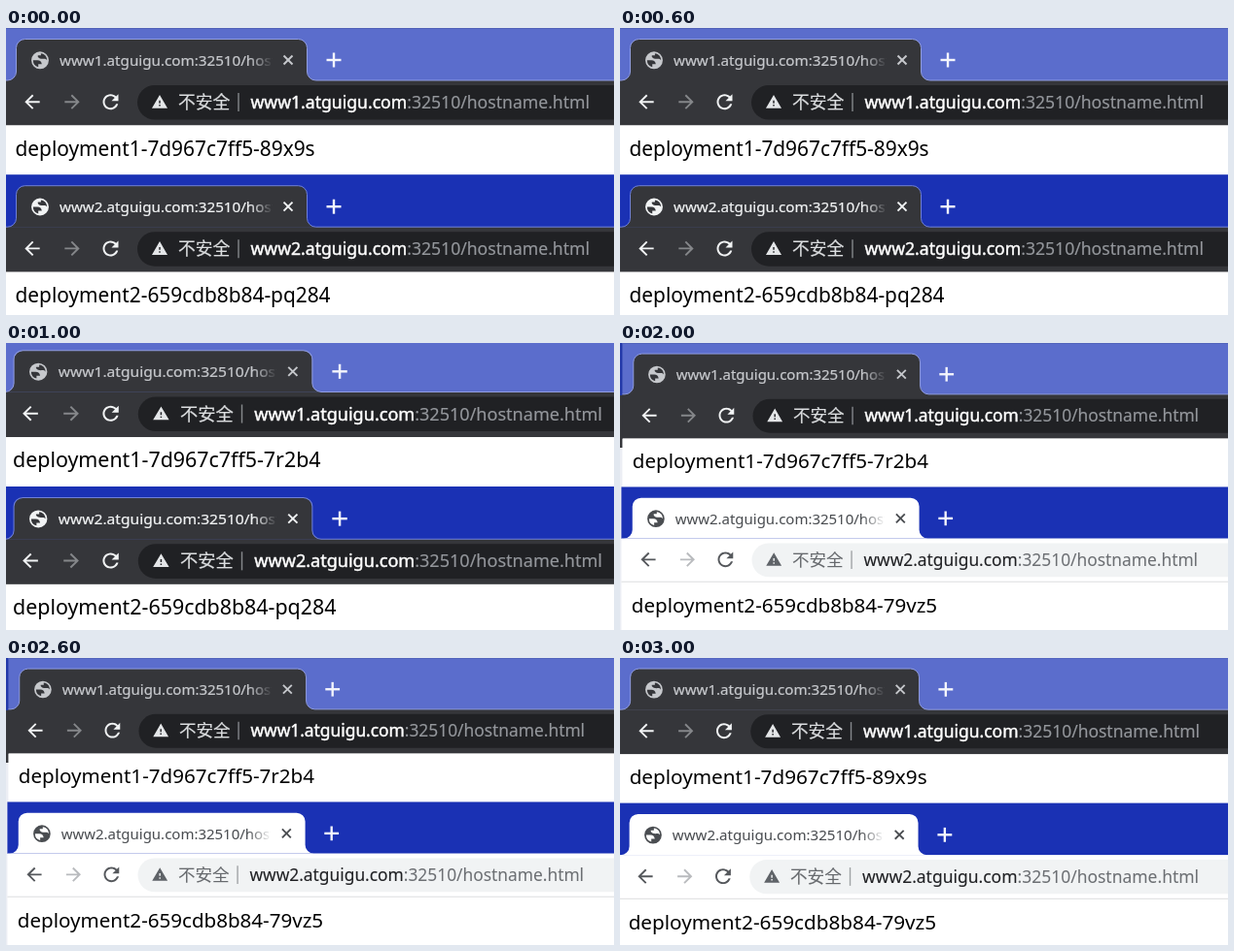
Animation, 625 px wide and 296 px high, one loop 4 s. Source, as an HTML page with a canvas:

```html
<!DOCTYPE html>
<html lang="zh">
<head>
<meta charset="utf-8">
<style>
html, body { margin: 0; width: 100%; height: 100%; overflow: hidden; background: #fff; }
canvas { display: block; }
</style>
</head>
<body>
<canvas id="stage" width="625" height="296"></canvas>
<script>
const ctx = document.getElementById('stage').getContext('2d');
const LATIN = '"Noto Sans", "Open Sans", sans-serif';
const CJK = '"Noto Sans CJK SC", "Noto Sans CJK", sans-serif';

const ICONS = {
  globe: 'M2 12a10 10 0 1 0 20 0a10 10 0 1 0 -20 0zM4 12h5c3 0 4.6 1.7 5 4.5h-4v3.2A8 8 0 0 1 4 12zM13 4.1C17.5 4.6 20 8 20 12c-.8-1.3-2-1.7-3.3-1.7C14 10.5 11 10.5 9.5 8V6.5H13z',
  arrow: 'M20 11H7.83l5.59-5.59L12 4l-8 8 8 8 1.41-1.41L7.83 13H20v-2z',
  reload: 'M17.65 6.35C16.2 4.9 14.21 4 12 4c-4.42 0-7.99 3.58-7.99 8s3.57 8 7.99 8c3.73 0 6.84-2.55 7.73-6h-2.08c-.82 2.33-3.04 4-5.65 4-3.31 0-6-2.69-6-6s2.69-6 6-6c1.66 0 3.14.69 4.22 1.78L13 11h7V4l-2.35 2.35z',
  warning: 'M1 21h22L12 2 1 21zm12-3h-2v-2h2v2zm0-4h-2v-4h2v4z'
};
for (const name in ICONS) ICONS[name] = new Path2D(ICONS[name]);

// "bold" is the extra stroke that thickens light text on dark
const DARK = {
  bar: '#35363a', pill: '#202124', icon: '#f1f3f4', off: '#85878a', warn: '#e4e6e8', bold: 0.45,
  label: '#dcdee0', host: '#ffffff', path: '#94979c', split: '#85888c', title: '#f1f3f4', edge: '#6f80d8'
};
const DIMMED = { ...DARK, title: '#c6c8cc', edge: '#919de0' };
const LIGHT = {
  bar: '#ffffff', pill: '#f1f3f4', icon: '#55585c', off: '#b9bbbe', warn: '#5f6368', bold: 0.1,
  label: '#66696d', host: '#202124', path: '#6c6f73', split: '#a0a3a6', title: '#4a4d51'
};

// Placement of the page (offset and scale) and the pod names shown
const SCENES = [
  { x: 0, y: 0, sx: 1, sy: 1, shift: 0, pods: ['89x9s', 'pq284'], theme: DARK },
  { x: -2.7, y: -3.8, sx: 1.026, sy: 1.004, shift: 0, pods: ['7r2b4', 'pq284'], theme: DARK },
  { x: 3.4, y: -0.2, sx: 0.986, sy: 0.983, shift: -1, pods: ['7r2b4', '79vz5'], theme: LIGHT, sliver: true },
  { x: 0.2, y: -0.4, sx: 0.993, sy: 0.992, shift: -1, pods: ['89x9s', '79vz5'], theme: LIGHT }
];

function rect(x, y, w, h, color) {
  ctx.fillStyle = color;
  ctx.fillRect(x, y, w, h);
}

function text(str, x, y, size, color, bold = 0, family = LATIN) {
  ctx.font = `${size}px ${family}`;
  ctx.fillStyle = ctx.strokeStyle = color;
  ctx.fillText(str, x, y);
  if (bold) {
    ctx.lineWidth = bold;
    ctx.strokeText(str, x, y);
  }
  return x + ctx.measureText(str).width;
}

function icon(name, x, y, size, color, flip = 1) {
  ctx.save();
  ctx.translate(x, y);
  ctx.scale(size / 24 * flip, size / 24);
  ctx.translate(-12, -12);
  ctx.fillStyle = color;
  ctx.fill(ICONS[name], 'evenodd');
  ctx.restore();
}

function line(x1, y1, x2, y2, color, width) {
  ctx.strokeStyle = color;
  ctx.lineWidth = width;
  ctx.beginPath();
  ctx.moveTo(x1, y1);
  ctx.lineTo(x2, y2);
  ctx.stroke();
}

function tab(theme) {
  const top = 11.5, base = 54, left = 10.5, right = 309.5, r = 9;
  ctx.beginPath();
  ctx.moveTo(-1, base);
  ctx.arcTo(left, base, left, top, r);
  ctx.arcTo(left, top, right, top, r);
  ctx.arcTo(right, top, right, base, r);
  ctx.arcTo(right, base, 700, base, r);
  ctx.lineTo(700, base);
  ctx.fillStyle = theme.bar;
  ctx.fill();
  if (theme.edge) {
    ctx.strokeStyle = theme.edge;
    ctx.lineWidth = 1;
    ctx.stroke();
  }
}

function browser(n, pod, strip, theme) {
  const host = `www${n}.atguigu.com`, path = ':32510/hostname.html';
  rect(-1, 0, 701, 54.5, strip);
  rect(-1, 54, 701, 46.5, theme.bar);
  rect(-1, 100.5, 701, 220, '#fff');
  if (theme === LIGHT) rect(-1, 99, 701, 1, '#dcdddf');
  tab(theme);

  icon('globe', 35, 33.3, 21.5, theme.title);
  const fade = ctx.createLinearGradient(250, 0, 274, 0);
  fade.addColorStop(0, theme.title);
  fade.addColorStop(1, theme.title + '00');
  text(host + path, 55, 39, 15.2, fade, theme.bold / 2);
  line(285.5, 28.5, 294.5, 37.5, theme.title, 1.9);
  line(294.5, 28.5, 285.5, 37.5, theme.title, 1.9);
  line(329.5, 33, 344.5, 33, '#f4f5fc', 2.4);
  line(337, 25.5, 337, 40.5, '#f4f5fc', 2.4);

  icon('arrow', 27, 76.2, 23, theme.icon);
  icon('arrow', 68, 76.2, 23, theme.off, -1);
  icon('reload', 107.5, 76.2, 24, theme.icon);
  ctx.fillStyle = theme.pill;
  ctx.beginPath();
  ctx.roundRect(135, 59, 600, 35.5, 17.7);
  ctx.fill();
  icon('warning', 158, 76.2, 17.5, theme.warn);
  text('不安全', 177, 83, 17.8, theme.label, theme.bold / 2, CJK);
  line(239, 67, 239, 86, theme.split, 1.4);
  const end = text(host, 251.5, 83, 17.6, theme.host, theme.bold);
  text(path, end, 83, 17.6, theme.path, theme.bold / 3);

  text(`deployment${n}-${pod}`, 9.5, 131.7, 20.85, '#000');
}

function draw() {
  const s = SCENES[Math.floor(performance.now() / 1000) % SCENES.length];
  ctx.setTransform(1, 0, 0, 1, 0, 0);
  rect(0, 0, 625, 296, '#fff');
  if (s.sliver) {
    rect(0, 0, 3, 54, '#2238a8');
    rect(0, 54, 3, 54, '#35363a');
    rect(0, 108, 3, 188, '#eceef4');
  }
  ctx.setTransform(s.sx, 0, 0, s.sy, s.x, s.y);
  browser(1, '7d967c7ff5-' + s.pods[0], '#5b6dcc', DIMMED);
  rect(-1, 0, 701, 1, '#4f60b8');
  ctx.setTransform(s.sx, 0, 0, s.sy, s.x + s.shift, s.y + 151.2 * s.sy);
  browser(2, '659cdb8b84-' + s.pods[1], '#1a31b4', s.theme);
  requestAnimationFrame(draw);
}
draw();
</script>
</body>
</html>
```
